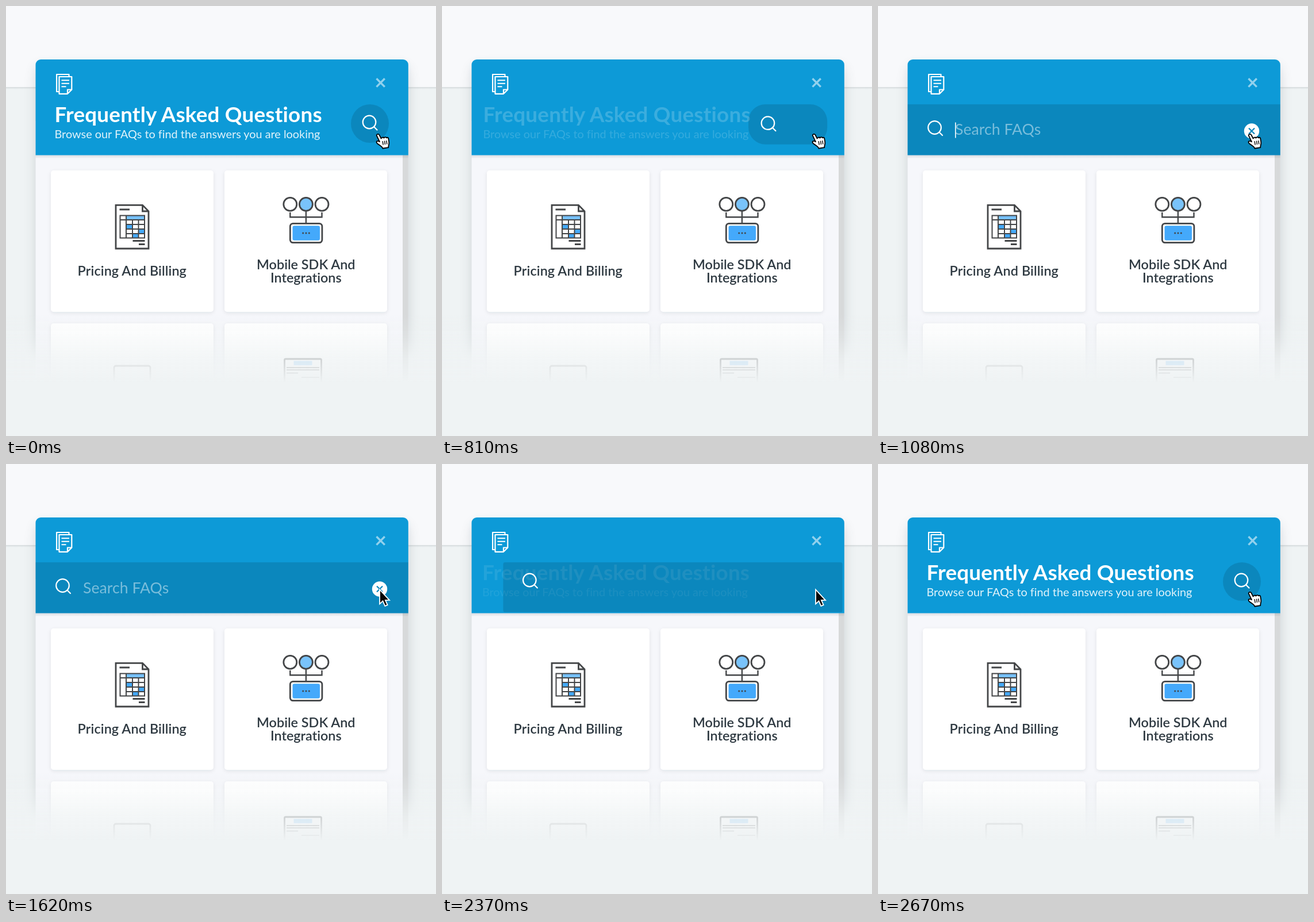
An HTML page for the animation above (2700 ms loop, 748 by 748 pixels).

```html
<!DOCTYPE html>
<html lang="en">
<head>
<meta charset="utf-8">
<title>FAQ search</title>
<style>
  html, body { margin: 0; width: 100%; height: 100%; overflow: hidden; background: #eff3f4; }
  svg { display: block; width: 100vw; height: 100vh; }
  text { font-family: Lato, "Open Sans", sans-serif; font-variant-ligatures: none; }
  .label { font-size: 23.4px; font-weight: 600; fill: #2f3a42; text-anchor: middle; }
  .line { fill: none; stroke: #434547; stroke-width: 2.8; }
  .white { fill: none; stroke: #fff; stroke-width: 2.2; }
</style>
</head>
<body>
<svg viewBox="0 0 748 748">
  <defs>
    <linearGradient id="fade" x1="0" y1="0" x2="0" y2="1">
      <stop offset="0" stop-color="#eff3f4" stop-opacity="0"/>
      <stop offset=".3" stop-color="#eff3f4" stop-opacity=".28"/>
      <stop offset=".65" stop-color="#eff3f4" stop-opacity=".74"/>
      <stop offset="1" stop-color="#eff3f4"/>
    </linearGradient>
    <linearGradient id="edge" x1="0" y1="0" x2="0" y2="1">
      <stop offset="0" stop-color="#26343c" stop-opacity=".13"/>
      <stop offset="1" stop-color="#26343c" stop-opacity="0"/>
    </linearGradient>
    <filter id="blur" x="-20%" y="-20%" width="140%" height="140%"><feGaussianBlur stdDeviation="11"/></filter>
    <filter id="soft" x="-10%" y="-10%" width="120%" height="120%">
      <feDropShadow dx="0" dy="2" stdDeviation="3" flood-color="#27343c" flood-opacity=".09"/>
    </filter>
    <clipPath id="head"><path d="M51.500 259.500V102a9 9 0 0 1 9-9H690.800a9 9 0 0 1 9 9V259.500Z"/></clipPath>
  </defs>

  <rect width="748" height="748" fill="#eff3f4"/>
  <rect width="748" height="141" fill="#f8f9fb"/>
  <rect y="141" width="748" height="4" fill="url(#edge)"/>

  <rect x="54" y="106" width="644" height="502" rx="9" fill="#25323a" opacity=".2" filter="url(#blur)"/>
  <rect x="51.500" y="200" width="648.300" height="460" fill="#f6f7fb"/>
  <rect x="690" y="259" width="9.800" height="400" fill="#d7d9da"/>

  <g fill="#fff" filter="url(#soft)">
    <rect x="78" y="286" width="283" height="246" rx="5"/>
    <rect x="380" y="286" width="283" height="246" rx="5"/>
    <rect x="78" y="552" width="283" height="140" rx="5"/>
    <rect x="380" y="552" width="283" height="140" rx="5"/>
  </g>

  <!-- invoice -->
  <g>
    <path class="line" d="M191 346.300H237.500L248 357V422H191ZM237.500 346.300V357H248"/>
    <path class="line" d="M197.500 354H215M220.500 408.500H241.500M231 414.500H241.500"/>
    <rect x="209" y="364.500" width="32" height="7.500" fill="#76c0fa"/>
    <path fill="#44a9fb" d="M209 380h11v8h-11zM230.500 388h11v8h-11zM220 396h11v8h-11z"/>
    <path class="line" style="stroke-width:2" d="M198.500 364.500H241V403.500H198.500ZM209 364.500V403.500M220 372V403.500M230.500 372V403.500M198.500 372H241M209 380H241M209 388H241M209 396H241"/>
  </g>

  <!-- devices -->
  <g>
    <circle class="line" cx="494.300" cy="344.800" r="11.500"/>
    <circle class="line" cx="549.500" cy="344.800" r="11.500"/>
    <circle class="line" cx="521.900" cy="344.800" r="11.500" style="fill:#79c3fb"/>
    <path class="line" style="stroke-width:2.400" d="M494.300 359V367.300H549.500V359M521.900 357V377"/>
    <rect class="line" x="494.300" y="378.400" width="55.600" height="33.200" rx="5"/>
    <rect x="498.500" y="382.300" width="47.500" height="25.400" rx="3" fill="#44a9fb"/>
    <g fill="#434547"><circle cx="516.700" cy="395" r="1.500"/><circle cx="522" cy="395" r="1.500"/><circle cx="527.300" cy="395" r="1.500"/></g>
  </g>

  <text class="label" x="219.300" y="469" letter-spacing=".1">Pricing And Billing</text>
  <text class="label" x="521.800" y="457.500">Mobile SDK And</text>
  <text class="label" x="521.800" y="480.500">Integrations</text>

  <!-- second row -->
  <g opacity=".75">
    <rect class="line" x="188" y="626" width="63" height="50" rx="3" opacity=".6"/>
    <rect class="line" x="484.500" y="614" width="64" height="60" rx="2"/>
    <rect x="500.500" y="617.500" width="32" height="7.500" fill="#76c0fa"/>
    <path class="line" style="stroke-width:2" d="M488 629H545M488 633H545M488 638.500H508M514 646H545"/>
  </g>

  <rect y="535" width="748" height="120" fill="url(#fade)"/>
  <rect y="654" width="748" height="94" fill="#eff3f4"/>

  <!-- header -->
  <rect x="51.500" y="259.500" width="648.300" height="6" fill="url(#edge)"/>
  <g clip-path="url(#head)">
    <rect x="51" y="92" width="650" height="168" fill="#0d9ad7"/>
    <g transform="translate(-.5 0)">
      <path class="white" stroke-linejoin="round" d="M93 123H114.800V145.500L107.500 152.800H93ZM107.500 152.800V145.500H114.800M92 149H88.600V119H110V122"/>
      <path class="white" style="stroke-width:2" d="M97 129.300H110.500M97 134.800H110.500M97 140.200H105"/>
    </g>
    <path d="M644.500 126.300L658.800 140.600M658.800 126.300L644.500 140.600" stroke="#fff" stroke-opacity=".55" stroke-width="3.400"/>
    <g id="title" fill="#fff">
      <text x="84.500" y="202" font-size="36.800" font-weight="700" letter-spacing=".2">Frequently Asked Questions</text>
      <text x="84.500" y="230" font-size="19.850" fill-opacity=".88">Browse our FAQs to find the answers you are looking</text>
    </g>
    <rect id="panel" y="171" fill="#000" fill-opacity=".12"/>
    <g id="lens" class="white">
      <circle r="11.300"/>
      <path d="M8 8L13.500 13.500" stroke-linecap="round"/>
    </g>
    <text id="hint" font-size="26.700" fill="#fff" fill-opacity=".45">Search FAQs</text>
    <rect id="caret" width="1.600" height="27" fill="#fff"/>
    <g id="clear">
      <circle r="13.200" fill="#fff"/>
      <path d="M-5 -5L5 5M5 -5L-5 5" stroke="#0c87bd" stroke-width="2.200"/>
    </g>
  </g>

  <!-- pointers -->
  <g id="hand" stroke="#000" stroke-linejoin="round" transform="rotate(-9 656 236)">
    <path fill="#fff" stroke-width="1.800" d="M646.500 223.500C647 221 650.500 221 651.300 223.500L653.500 230C655 227.800 658 228.300 658.500 229.800C660 228 662.500 228.600 663 230.300C664.500 229.500 666 230.300 666 232V238C666 242 664 243.500 663.500 247.500H653.500C653 243.500 648 241 645 236.800C643.500 234 646 232.500 648.500 234L650 235.200Z"/>
    <path fill="none" stroke-width="1.400" d="M655.300 235V241.500M658.700 235V241.500M662 235V241.500"/>
  </g>
  <path id="arrow" d="M650 218.500V243.500L655.500 238.300L659.300 247L663.600 245.200L659.900 236.800H667Z" fill="#050505" stroke="#fff" stroke-width="1.800"/>
</svg>
<script>
const LOOP = 2700;
const el = id => document.getElementById(id);
const [title, panel, lens, hint, caret, clear, hand, arrow] =
  ['title', 'panel', 'lens', 'hint', 'caret', 'clear', 'hand', 'arrow'].map(el);

const ramp = (t, from, to) => Math.min(1, Math.max(0, (t - from) / (to - from)));
const inOut = u => u < .5 ? 16 * u ** 5 : 1 - 16 * (1 - u) ** 5;
const mix = (a, b, p) => a + (b - a) * p;
const set = (node, attrs) => { for (const k in attrs) node.setAttribute(k, attrs[k]); };
const move = (node, x, y) => set(node, { transform: `translate(${x} ${y})` });

function draw(t) {
  const closing = t > 1650;
  const open = inOut(ramp(t, 630, 1110)) - inOut(ramp(t, 2196, 2678));

  const left = mix(600, 51, open), right = mix(666, 700, open), bottom = mix(238, 260, open);
  set(panel, { x: left, width: right - left, height: bottom - 171, rx: 33.5 * (1 - open) });

  const drop = closing ? 1 - ramp(t, 2196, 2360) : Math.min(1, open / .7);
  const lensX = mix(632, 98.5, open);
  move(lens, lensX, mix(202, 211.5, drop));

  const mid = (171 + bottom) / 2;
  const leave = 1 - ramp(t, 2100, 2280);
  set(hint, { x: lensX + 35.5, y: mid + 9, opacity: ramp(t, 830, 895) * leave });
  set(caret, { x: lensX + 35.5, y: mid - 13, opacity: t > 830 && t < 1260 ? 1 : 0 });

  move(clear, right - 50, 217.5);
  set(clear, { opacity: ramp(t, 830, 1010) * leave });

  const shown = 1 - inOut(ramp(t, 540, 1000)) + inOut(ramp(t, 2190, 2700));
  move(title, -16 * (1 - shown), 0);
  set(title, { opacity: shown });

  const pointing = t < 480 || (t >= 720 && t < 1380) || t >= 2580;
  set(hand, { visibility: pointing ? 'visible' : 'hidden' });
  set(arrow, { visibility: pointing ? 'hidden' : 'visible' });
}

function tick() {
  draw(performance.now() % LOOP);
  requestAnimationFrame(tick);
}
tick();
</script>
</body>
</html>
```
